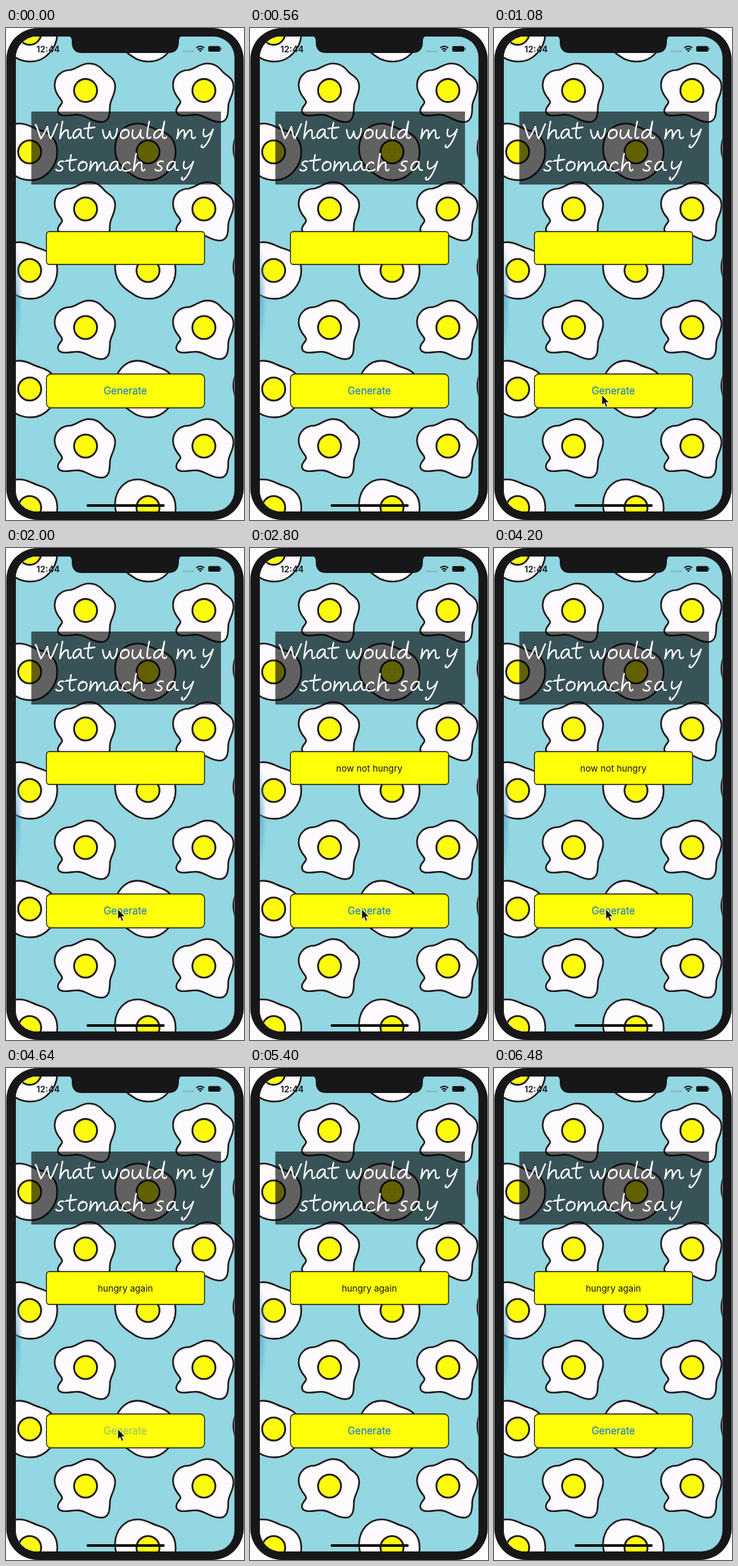
These frames come from a looping animation (362 by 748 pixels, 6520 ms). An HTML page:

```html
<!DOCTYPE html>
<html lang="en">
<head>
<meta charset="utf-8">
<title>What would my stomach say</title>
<style>
  html, body { margin: 0; width: 100%; height: 100%; overflow: hidden; background: #fff; }
  svg { display: block; width: 362px; height: 748px; }
  text { font-family: Inter, Roboto, sans-serif; text-anchor: middle; }
  .egg { fill: #fdfbfd; stroke: #241a1c; stroke-width: 2.6; stroke-linejoin: round; }
  .yolk { fill: #fbfb0b; stroke: #241a1c; stroke-width: 2.8; }
  .box { fill: #ffff0a; stroke: #111; stroke-width: 1.3; }
  #title { fill: none; stroke: #fff; stroke-width: 2.3; stroke-linecap: round; stroke-linejoin: round; }
</style>
</head>
<body>
<svg viewBox="0 0 362 748">
  <defs>
    <clipPath id="screen"><rect x="15" y="13" width="332.5" height="722" rx="32"/></clipPath>
    <radialGradient id="glow">
      <stop offset="0" stop-color="#4f9fc4" stop-opacity=".75"/>
      <stop offset="1" stop-color="#4f9fc4" stop-opacity="0"/>
    </radialGradient>
    <g id="wavy">
      <path class="egg" d="M-47-8C-47-22-36-31-24-31C-14-32-8-41 5-41C18-41 24-34 29-28C33-23 45-20 45-6C45 8 37 14 37 25C37 36 36 48 24 48C10 48 2 38-10 37C-20 36-24 39-34 38C-42 37-44 31-40 25C-37 20-33 19-38 13C-43 7-47 1-47-8Z"/>
      <circle class="yolk" r="17.5"/>
    </g>
    <g id="round">
      <path class="egg" d="M-50-8C-49-26-36-43-16-43C-2-43 4-36 16-33C30-29 42-20 42 0C42 22 24 43 2 43C-14 43-20 38-30 31C-42 23-51 10-50-8Z"/>
      <circle class="yolk" r="17.5"/>
    </g>
  </defs>

  <rect x=".5" width="361" height="748" rx="48" fill="#17171a"/>
  <g clip-path="url(#screen)">
    <rect width="362" height="748" fill="#92d7e1"/>
    <g id="eggs"></g>
    <ellipse cx="14" cy="408" rx="11" ry="84" fill="url(#glow)"/>

    <rect x="38.5" y="127" width="288.5" height="111" opacity=".61"/>
    <g id="title" role="img" aria-label="What would my stomach say"></g>

    <rect class="box" x="61.5" y="309.5" width="240.5" height="50" rx="4.5"/>
    <text id="answer" x="181.5" y="339.5" font-size="13.6" fill="#111"></text>
    <rect class="box" x="61.5" y="526" width="240.5" height="51.5" rx="7"/>
    <text id="button" x="181.5" y="557.2" font-size="15.2" fill="#2381c4" stroke="#2381c4" stroke-width=".2">Generate</text>

    <text x="64" y="37" font-size="13.2" font-weight="600" fill="#14191a">12:44</text>
    <path d="M269.5 35.5H285" stroke="#709fa7" stroke-width="2" stroke-dasharray="2.5 1.8"/>
    <g fill="none" stroke="#111" stroke-width="1.9">
      <path d="M289.5 30.3Q295.5 25.2 301.5 30.3M291.6 33Q295.5 29.7 299.4 33"/>
      <path d="M295.5 36.7L293.4 34.4Q295.5 32.8 297.6 34.4Z" fill="#111" stroke="none"/>
    </g>
    <rect x="307.5" y="27.5" width="18.5" height="8.5" rx="2.3" fill="#111"/>
    <rect x="326.7" y="30" width="1.3" height="3.5" rx=".6" fill="#345"/>
    <rect x="122.5" y="724" width="119" height="4" rx="2" fill="#0b0b0b"/>
    <path id="cursor" d="M0 0V15.5L3.5 12.2L6 18.3L8.7 17.2L6.2 11.3H11Z" fill="#111" stroke="#eee" stroke-width=".9"/>
  </g>
  <path d="M94 12Q100 13 100 19V23Q101 38 115 38H248Q262 38 263 23V19Q263 13 269 12Z" fill="#17171a"/>
</svg>

<script>
const $ = id => document.getElementById(id);

let eggs = '';
const egg = (kind, x, y) => eggs += `<use href="#${kind}" x="${x}" y="${y}"/>`;
for (let row = 0; row < 5; row++) {
  for (let col = 0; col < 3; col++) {
    egg('round', 36 + 180 * col, 8 + 180.3 * row);
    egg('wavy', 121 + 180 * col, 95 + 180.2 * row);
  }
}
$('eggs').innerHTML = eggs;

// Handwritten letters as pen strokes, baseline at y = 0.
const pen = {
  W: 'M0-21C4-15 5-6 8 0C12-5 15-12 18-18C19-10 20-4 23 0C27-7 30-16 33-22',
  h: 'M4-26C2-17 1-8 0 0C3-8 7-13 11-13C14-13 11-4 13-1C14 1 16 0 17-2',
  a: 'M12-13C6-17 0-9 0-4C0 2 7 0 12-11C11-5 12 0 17-1',
  t: 'M8-24C6-14 5-6 6-2C7 1 11 0 13-2M0-15L16-17',
  w: 'M0-13C1-6 2-1 5 0C8-1 10-7 11-11C11-5 13 0 16 0C20-2 22-9 22-15',
  o: 'M7-14C1-13-1-5 1-2C4 2 13-2 13-8C13-13 9-15 5-12',
  u: 'M1-13C-1-6 0 0 4 0C9-1 12-8 13-13C12-6 12 0 17-1',
  l: 'M4-26C2-17 0-6 1-2C2 1 4 0 6-2',
  d: 'M12-12C6-16 0-9 0-4C0 2 8 0 12-9L16-26C14-14 12-2 14-1C16 0 17 0 19-2',
  m: 'M2-14C2-9 1-4 0 0C3-7 7-13 10-13C13-12 11-5 11 0C14-7 18-13 21-13C24-12 21-3 23-1C24 0 26 0 28-2',
  y: 'M4-14C2-8 3-3 6-3C11-4 16-9 18-14C15-4 10 8 4 13C1 15-1 12 1 10',
  s: 'M12-14C7-16 2-12 4-9C7-7 11-6 10-3C8 1 2 1 0-2',
  c: 'M11-11C9-16 0-11 0-4C0 2 8 1 13-2'
};
const write = (word, y, xs) => [...word].map((ch, i) =>
  `<path d="${pen[ch]}" transform="translate(${xs[i]} ${y})"/>`).join('');
$('title').innerHTML =
  write('What', 168, [45, 82, 102, 119]) +
  write('would', 168, [147, 174, 192, 214, 225]) +
  write('my', 168, [260, 297]) +
  write('stomach', 217, [76, 91, 110, 127, 158, 177, 194]) +
  write('say', 217, [227, 245, 267]);

const LOOP = 6520;
const path = [ // time, x, y of the pointer tip
  [700, 150, 738], [1040, 164, 558], [1200, 164, 558], [1600, 170, 549],
  [4880, 170, 549], [5260, 5, 640]
];
const taps = [
  { down: 2120, up: 2320, says: 'now not hungry' },
  { down: 4400, up: 4600, says: 'hungry again' }
];
const clamp = v => Math.min(1, Math.max(0, v));
const ease = v => v * v * (3 - 2 * v);

function pointer(t) {
  const i = path.findIndex(p => p[0] > t);
  if (i < 1) return null;
  const [a, b] = [path[i - 1], path[i]];
  const k = ease(clamp((t - a[0]) / (b[0] - a[0])));
  return [a[1] + (b[1] - a[1]) * k, a[2] + (b[2] - a[2]) * k];
}

function draw(now) {
  const t = now % LOOP;
  const at = pointer(t);
  $('cursor').setAttribute('visibility', at ? 'visible' : 'hidden');
  if (at) $('cursor').setAttribute('transform', `translate(${at})`);

  let says = '', alpha = 1;
  for (const tap of taps) {
    if (t >= tap.up) says = tap.says;
    if (t >= tap.down) alpha = t < tap.up ? 0.35 : 0.35 + 0.65 * clamp((t - tap.up) / 250);
  }
  $('answer').textContent = says;
  $('button').setAttribute('opacity', alpha);
}

const start = performance.now();
(function tick() {
  draw(performance.now() - start);
  requestAnimationFrame(tick);
})();
</script>
</body>
</html>
```
